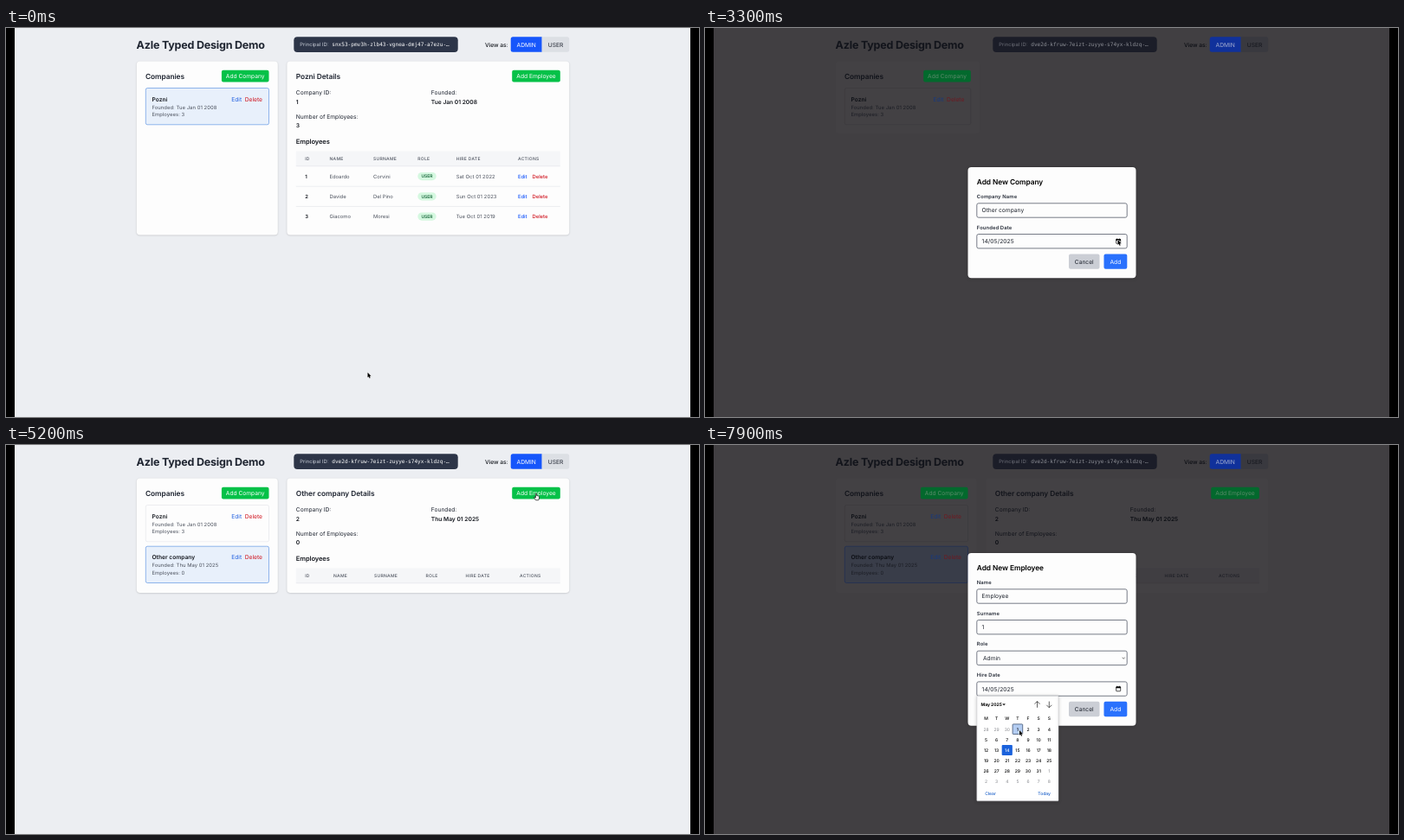
An HTML page with a canvas that plays this animation: 800x450 px, repeating every 8000 ms.

```html
<!DOCTYPE html>
<html lang="en">
<head>
<meta charset="utf-8">
<title>Typed design demo</title>
<style>
  html, body { margin: 0; width: 100%; height: 100%; overflow: hidden; background: #000; }
  canvas { display: block; width: 800px; height: 450px; }
</style>
</head>
<body>
<canvas id="stage"></canvas>
<script>
const LOOP = 8000, STEP = 100;
const canvas = document.getElementById('stage');
const ctx = canvas.getContext('2d');
const ratio = window.devicePixelRatio || 1;
canvas.width = 800 * ratio;
canvas.height = 450 * ratio;

// Text sizes, with the tracking each one uses
const XS = 5, SM = 5.833, MD = 6.667, LG = 7.5, XL = 8.333, XXL = 12.5;
const TRACK = { [SM]: 0.07, [LG]: -0.08, [XL]: -0.06, [XXL]: -0.2 };

const LIGHT = {
  bg: '#eceef2', card: '#fdfdfd', line: '#e1e3e8', ink: '#15181f', head: '#1e2430', mute: '#4a505c',
  blue: '#1656fb', onBlue: '#fff', green: '#05c148', onGreen: '#fff', red: '#d0141f', link: '#2160e0',
  pill: '#2d3548', pillLabel: '#c9ced8', pillText: '#fff', grey: '#dcdfe4', sel: '#e8f0fb',
  selLine: '#4a86e0', thead: '#f5f6f8', badge: '#d5f8e0', badgeText: '#17663a'
};
const DARK = {
  bg: '#413f42', card: '#434144', line: '#3b393d', ink: '#0c0e14', head: '#12141b', mute: '#1b1d24',
  blue: '#10319b', onBlue: '#a3add0', green: '#03692d', onGreen: '#5b8a6b', red: '#6e1a22', link: '#17397f',
  pill: '#1b1d28', pillLabel: '#6d6f78', pillText: '#8d8f96', grey: '#39393f', sel: '#393d49',
  selLine: '#182a58', thead: '#403e42'
};
let P = LIGHT;

const COMPANY = 'Pozni', OTHER = 'Other company';
const STAFF = [
  ['Edoardo', 'Corvini', 'Sat Oct 01 2022'],
  ['Davide', 'Del Pino', 'Sun Oct 01 2023'],
  ['Giacomo', 'Moresi', 'Tue Oct 01 2019']
];
const IDS = ['snx53-pmv3h-zlb43-vgnea-dmj47-a7ezu-…', '2vxsx-fae', 'dve2d-kfruw-7eizt-zuyye-s74yx-kldzq-…'];

function text(s, x, y, size, weight, color, align = 'left', track = TRACK[size] || 0) {
  ctx.font = `${weight} ${size}px Inter, sans-serif`;
  ctx.letterSpacing = track + 'px';
  ctx.textAlign = align;
  ctx.fillStyle = color;
  ctx.fillText(s, x, y + size * 0.36);
}

function box(x, y, w, h, r, fill, stroke, width = 0.6) {
  ctx.beginPath();
  ctx.roundRect(x, y, w, h, r);
  ctx.fillStyle = fill;
  ctx.fill();
  if (stroke) {
    ctx.strokeStyle = stroke;
    ctx.lineWidth = width;
    ctx.stroke();
  }
}

function lines(points, color, width, fill) {
  ctx.beginPath();
  points.forEach(([x, y]) => ctx.lineTo(x, y));
  if (fill) {
    ctx.closePath();
    ctx.fillStyle = fill;
    ctx.fill();
  }
  ctx.strokeStyle = color;
  ctx.lineWidth = width;
  ctx.lineJoin = 'round';
  ctx.stroke();
}

function shadowed(blur, draw) {
  ctx.save();
  ctx.shadowColor = 'rgba(0,0,0,.2)';
  ctx.shadowBlur = blur * ratio;
  ctx.shadowOffsetY = 0.6 * ratio;
  draw();
  ctx.restore();
}

function card(x, w, bottom) {
  const draw = () => box(x, 38.5, w, bottom - 38.5, 4, P.card);
  P === LIGHT ? shadowed(2, draw) : draw();
}

function button(label, x, y, w, h, fill, color) {
  box(x, y, w, h, 2, fill);
  text(label, x + w / 2, y + h / 2, MD, 400, color, 'center');
}

function header(id, admin) {
  text('Azle Typed Design Demo', 150.6, 19.3, XXL, 700, P.head);
  const x = id === IDS[1] ? 385 : 332.3;
  box(x, 10.3, 2 * (427 - x), 17.6, 4, P.pill);
  text('Principal ID:', x + 7, 19.4, SM, 400, P.pillLabel, 'left', 0);
  ctx.font = '6.08px "DejaVu Sans Mono", monospace';
  ctx.letterSpacing = '0px';
  ctx.fillStyle = P.pillText;
  ctx.fillText(id, x + 44, 21.2);
  text('View as:', 553, 19.3, MD, 500, P.ink, 'left', -0.05);
  const tab = (label, left, w, on, r) => {
    box(left, 10.3, w, 17.5, r, on ? P.blue : P.grey);
    text(label, left + w / 2, 19.2, MD, 400, on ? P.onBlue : P.head, 'center');
  };
  tab('ADMIN', 582.7, 36, admin, [2.5, 0, 0, 2.5]);
  tab('USER', 618.7, 31.5, !admin, [0, 2.5, 2.5, 0]);
}

function companyItem(y, right, c, selected, admin) {
  box(161.3, y, right - 161.3, 42.3, 2, selected ? P.sel : P.card, selected ? P.selLine : P.line);
  text(c.name, 168.5, y + 12.7, MD, 600, P.ink);
  text('Founded: ' + c.date, 168.5, y + 22, SM, 400, P.mute);
  text('Employees: ' + c.count, 168.5, y + 30.8, SM, 400, P.mute);
  if (admin) {
    text('Edit', right - 43.3, y + 12.7, MD, 400, P.link);
    text('Delete', right - 27.7, y + 12.7, MD, 400, P.red);
  }
}

function companyList(list, picked, admin, bottom) {
  const right = picked < 0 ? 306.8 : 303.5;
  card(150.8, right - 140.5, bottom);
  text('Companies', 161, admin ? 56 : 55, XL, 600, P.head);
  if (admin) button('Add Company', right - 54.6, 48.7, 54.6, 13.7, P.green, P.onGreen);
  list.forEach((c, i) => companyItem((admin ? 69.5 : 67.8) + 47.7 * i, right, c, i === picked, admin));
}

function details(c, id, admin, bottom) {
  const dy = admin ? 0 : -1.8;
  card(324.3, 326, bottom);
  text(c.name + ' Details', 334.8, admin ? 56 : 55, XL, 600, P.head);
  [['Company ID:', id, 334.8, 75], ['Founded:', c.date, 490.8, 75], ['Number of Employees:', c.count, 334.8, 102.7]]
    .forEach(([label, value, x, y]) => {
      text(label, x, y + dy, MD, 400, P.head);
      text(value, x, y + 10.3 + dy, MD, 600, P.ink);
    });
  if (!admin) return;
  button('Add Employee', 584.2, 48.7, 55.6, 13.7, P.green, P.onGreen);
  text('Employees', 334.8, 131.2, LG, 600, P.ink);
  box(334.8, 142.5, 305, 17.2, 0, P.thead);
  const cols = c.count ? [345.2, 373.5, 424, 475.3, 519.7, 591] : [345.2, 378, 425, 484.6, 530.5, 593];
  ['ID', 'NAME', 'SURNAME', 'ROLE', 'HIRE DATE', 'ACTIONS']
    .forEach((h, i) => text(h, cols[i], 151.2, XS, 500, P.mute, 'left', 0.28));
  lines([[334.8, 159.7], [639.8, 159.7]], P.line, 0.6);
  if (c.count) STAFF.forEach(([name, surname, date], i) => {
    const y = 171.6 + 23.25 * i;
    text(i + 1, cols[0], y, SM, 600, P.ink);
    text(name, cols[1], y, SM, 400, P.mute, 'left', 0);
    text(surname, cols[2], y, SM, 400, P.mute, 'left', 0);
    box(cols[3], y - 4.6, 21.4, 9.2, 4.6, P.badge);
    text('USER', cols[3] + 10.7, y, XS, 600, P.badgeText, 'center');
    text(date, cols[4], y, SM, 400, P.mute);
    text('Edit', cols[5], y, SM, 500, P.blue, 'left', 0);
    text('Delete', 607.5, y, SM, 500, P.red, 'left', 0);
    if (i < 2) lines([[334.8, y + 11.6], [639.8, y + 11.6]], P.line, 0.6);
  });
}

function calendarIcon(x, y) {
  box(x - 2.5, y - 2.2, 5, 4.9, 0.5, '#fff', '#000', 0.7);
  box(x - 2.7, y - 2.6, 5.4, 1.8, 0.3, '#000');
  box(x - 1.9, y - 3.3, 0.8, 1, 0, '#000');
  box(x + 1.1, y - 3.3, 0.8, 1, 0, '#000');
}

function modal(top, title, fields) {
  const n = fields.length, foot = top + 29 + 35.7 * n;
  shadowed(4, () => box(303.5, top, 194, 56.9 + 35.7 * n, 4, '#fdfdfd'));
  text(title, 313.8, top + 16.8, XL, 600, '#000');
  fields.forEach(([label, value, kind], i) => {
    const y = top + 50 + 35.7 * i;
    text(label, 313.8, y - 16, SM, 600, '#262c38', 'left', 0.12);
    box(313.8, y - 8.2, 173.4, 16.4, 2, '#fdfdfd', '#555b69', 0.8);
    text(value, kind === 'select' ? 321 : 319.6, y, MD, 400, '#1c212b', 'left', kind === 'date' ? 0.1 : 0);
    if (kind === 'date') calendarIcon(477.2, y);
    if (kind === 'select') lines([[481.8, y - 0.6], [483.3, y + 0.8], [484.8, y - 0.6]], '#333', 0.7);
  });
  button('Cancel', 420, foot, 35.5, 17.4, '#cbced5', '#1c212b');
  button('Add', 460.5, foot, 26.8, 17.4, '#2971fd', '#fff');
}

function arrowIcon(x, y, dir) {
  lines([[x, y - 3.6 * dir], [x, y + 3.6 * dir]], '#222', 0.7);
  lines([[x - 3, y + 0.6 * dir], [x, y + 3.6 * dir], [x + 3, y + 0.6 * dir]], '#222', 0.7);
}

function picker(top, mouse) {
  shadowed(4, () => box(313.8, top, 94.2, 121.6, 0.8, '#fff', '#c4c4c8', 0.5));
  text('May 2025', 318.5, top + 10, XS, 700, '#000', 'left', -0.02);
  lines([[343.6, top + 9.3], [346.6, top + 9.3], [345.1, top + 11]], '#000', 0.2, '#000');
  arrowIcon(383.5, top + 10, -1);
  arrowIcon(397.3, top + 10, 1);
  [...'MTWTFSS'].forEach((d, i) => text(d, 324.5 + 12.13 * i, top + 26, XS, 500, '#000', 'center'));
  for (let i = 0; i < 42; i++) {
    const x = 324.5 + 12.13 * (i % 7), y = top + 38.5 + 12.15 * Math.floor(i / 7);
    const inMonth = i > 2 && i < 34, day = i < 3 ? 28 + i : inMonth ? i - 2 : i - 33;
    const hover = Math.abs(mouse.x - x) < 6 && Math.abs(mouse.y - y) < 6;
    if (inMonth && day === 14) box(x - 6.1, y - 6.1, 12.2, 12.2, 1, '#1a62dc');
    else if (hover) box(x - 5.8, y - 5.8, 11.6, 11.6, 0.8, '#b4cdf2', '#2c3f60', 0.7);
    const color = !inMonth ? '#85878c' : day === 14 ? '#fff' : '#000';
    text(day, x, y, XS, inMonth ? 500 : 400, color, 'center');
  }
  text('Clear', 329.5, top + 113, XS, 500, '#1a5fc8', 'center');
  text('Today', 391.6, top + 113, XS, 500, '#1a5fc8', 'center');
}

// Pointer stops: time, x, y
const PATH = [
  [0, 417.5, 398.5], [100, 417.5, 398.5], [700, 632, 19], [900, 632, 19], [1100, 605, 21.3], [1300, 605, 21.3],
  [1500, 285, 57], [1600, 285, 57], [1800, 324.5, 96.5], [2000, 390, 210], [2900, 390, 210],
  [3200, 476.5, 245], [3400, 476.5, 245], [3800, 363, 294], [3900, 363, 294], [4100, 473, 270],
  [4200, 473, 270], [4500, 330, 193], [4700, 238, 140], [4800, 238, 140], [5100, 612, 56],
  [5200, 612, 56], [5300, 468, 160], [5500, 400, 174], [6200, 400, 174], [6400, 396, 210], [6700, 396, 210],
  [6900, 400, 245], [7100, 400, 245], [7300, 476.5, 281], [7500, 476.5, 281], [7800, 363, 330], [8000, 363, 330]
];

function pointer(t) {
  const i = PATH.findIndex(p => p[0] > t);
  const [t0, x0, y0] = PATH[i - 1], [t1, x1, y1] = PATH[i];
  const u = (t - t0) / (t1 - t0), k = u * u * (3 - 2 * u);
  return { x: x0 + (x1 - x0) * k, y: y0 + (y1 - y0) * k };
}

function drawPointer({ x, y }, hand) {
  ctx.save();
  ctx.translate(x, y);
  if (hand) {
    lines([[-0.6, 0.3], [0, -0.2], [0.6, 0.3], [0.6, 2.5], [2.9, 3.1], [3.7, 3.8], [3.4, 6], [2.7, 7.8],
      [-0.4, 7.8], [-2.4, 5], [-2.2, 4.2], [-0.6, 5]], '#111', 0.7, '#fff');
  } else {
    lines([[0, 0], [0, 5.8], [1.3, 4.7], [2.2, 6.7], [3.1, 6.3], [2.2, 4.3], [4, 4.2]], '#fff', 0.9, '#000');
    ctx.fill();
  }
  ctx.restore();
}

const within = (t, a, b) => t >= a && t < b;
const typed = (s, t, a, b) => s.slice(0, Math.max(0, Math.ceil(s.length * (t - a) / (b - a))));

function draw(t) {
  const addCompany = within(t, 1700, 4300), addEmployee = t >= 5300;
  const admin = !within(t, 800, 1300), mouse = pointer(t);
  const id = IDS[t < 800 ? 0 : t < 1300 ? 1 : 2];
  const list = [{ name: COMPANY, date: 'Tue Jan 01 2008', count: 3 }];
  if (t >= 4300) list.push({ name: OTHER, date: 'Thu May 01 2025', count: 0 });
  const picked = t < 1300 ? 0 : t >= 4800 ? 1 : -1;
  const bottom = t < 800 ? 239.5 : !admin ? 133.5 : t < 4300 ? 122 : picked < 0 ? 169.8 : 171;

  P = addCompany || addEmployee ? DARK : LIGHT;
  ctx.setTransform(ratio, 0, 0, ratio, 0, 0);
  ctx.textRendering = 'geometricPrecision';
  ctx.fillStyle = '#000';
  ctx.fillRect(0, 0, 800, 450);
  ctx.fillStyle = P.bg;
  ctx.fillRect(10, 0, 780, 450);
  header(id, admin);
  companyList(list, picked, admin, bottom);
  if (picked >= 0) details(list[picked], picked + 1, admin, bottom);

  if (addCompany) {
    modal(161, 'Add New Company', [
      ['Company Name', typed(OTHER, t, 2100, 2900)],
      ['Founded Date', t < 3900 ? '14/05/2025' : '01/05/2025', 'date']
    ]);
    if (within(t, 3400, 3900)) picker(254.6, mouse);
  }
  if (addEmployee) {
    modal(125, 'Add New Employee', [
      ['Name', typed('Employee', t, 5600, 6200)],
      ['Surname', t < 6600 ? '' : '1'],
      ['Role', t < 7100 ? 'User' : 'Admin', 'select'],
      ['Hire Date', '14/05/2025', 'date']
    ]);
    if (t >= 7500) picker(290.2, mouse);
  }
  const overButton = [700, 1100, 1500, 4100, 4700, 5100].some(a => within(t, a, a + 200));
  drawPointer(mouse, overButton);
}

function tick(now) {
  draw(Math.floor(now % LOOP / STEP) * STEP);
  requestAnimationFrame(tick);
}
requestAnimationFrame(tick);
</script>
</body>
</html>
```
